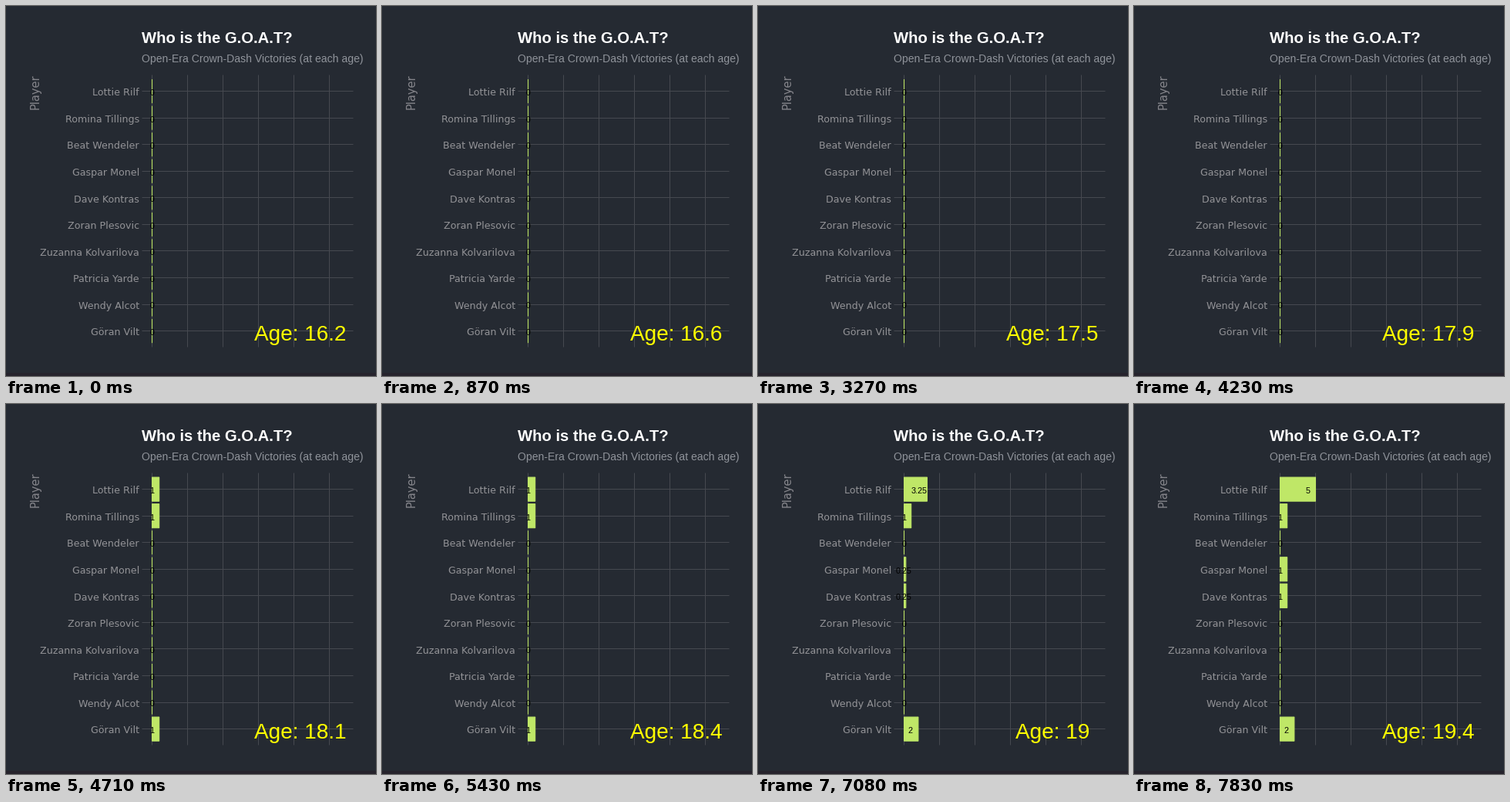
Animation of 480 by 480 pixels, one loop 8000 ms. Source, as a matplotlib script:

```python
import matplotlib.pyplot as plt
from matplotlib.animation import FuncAnimation
from matplotlib.patches import Rectangle

SIZE, DPI = 480, 96
PX = 72 / DPI                      # points per pixel
STEP, FRAMES = 20, 400

BG, GRID, BAR = "#252a32", "#464950", "#bfe767"
X0, UNIT = 189.5, 9.2              # zero line and pixels per win
ROW0, ROW_GAP, BAR_H = 110.6, 34.56, 31.1

NAMES = [
    "Lottie Rilf", "Romina Tillings", "Beat Wendeler", "Gaspar Monel",
    "Dave Kontras", "Zoran Plesovic", "Zuzanna Kolvarilova",
    "Patricia Yarde", "Wendy Alcot", "Göran Vilt",
]

# start of each win (ms) and the rows that gain one
WINS = [(4440, (0, 1, 9)), (5880, (0,)), (6840, (0, 9)),
        (7080, (0, 3, 4)), (7560, (0,))]

ROWS = [ROW0 + ROW_GAP * i for i in range(len(NAMES))]


def age_at(t):
    n = (t - 150) // 240 + 1
    if n > 10:                     # 17.2 is held for two beats
        n -= 1
    return round(16.2 + 0.1 * n, 1)


def wins_at(t):
    wins = [0.0] * len(NAMES)
    for start, rows in WINS:
        part = min(max((t - start) // 30 + 1, 0), 4) / 4
        for r in rows:
            wins[r] += part
    return wins


def label_x(v):
    return X0 + max(0, UNIT * v - 10.2)


fig = plt.figure(figsize=(SIZE / DPI, SIZE / DPI), dpi=DPI, facecolor=BG)
ax = fig.add_axes([0, 0, 1, 1])
ax.set(xlim=(0, SIZE), ylim=(SIZE, 0))
ax.axis("off")


def put(x, y, s, px, color, font="Liberation Sans", **kw):
    return ax.text(x, y, s, fontsize=px * PX, color=color, family=font, **kw)


# static parts; grid lines fall on whole pixels
ax.add_patch(Rectangle((0, 476), SIZE, 4, fc="#26232c", lw=0))
ax.vlines([int(X0 + 5 * UNIT * k) for k in range(6)], 89, 442,
          color=GRID, lw=PX, zorder=1)
ax.hlines([int(y) for y in ROWS], 176, 450, color=GRID, lw=PX, zorder=1)
put(176, 48, "Who is the G.O.A.T?", 20.2, "white", weight="bold")
put(176, 73, "Open-Era Crown-Dash Victories (at each age)", 14, "#8f939a")
put(42.5, 134, "Player", 14.6, "#85858b", "DejaVu Sans",
    rotation=90, rotation_mode="anchor")
for y, name in zip(ROWS, NAMES):
    put(173, y + 5.7, name, 12.6, "#929296", "DejaVu Sans", ha="right")

# moving parts
bars = [ax.add_patch(Rectangle((X0, y - BAR_H / 2), 0, BAR_H, fc=BAR, ec=BAR,
                               lw=1.07 * PX, joinstyle="miter", snap=False,
                               zorder=2))
        for y in ROWS]
labels = [put(X0, y + 5.4, "", 10.8, "black", ha="center", zorder=3)
          for y in ROWS]
age_text = put(382, 434.5, "", 28, "#ffff00", ha="center", zorder=4)


def draw(i):
    t = i * STEP + STEP // 2
    for v, bar, label in zip(wins_at(t), bars, labels):
        bar.set_width(UNIT * v)
        label.set_text(f"{v:g}")
        label.set_x(label_x(v))
    age_text.set_text(f"Age: {age_at(t):g}")
    return [*bars, *labels, age_text]


anim = FuncAnimation(fig, draw, frames=FRAMES, interval=STEP,
                     repeat=True, repeat_delay=0, blit=False)
plt.show()
```
